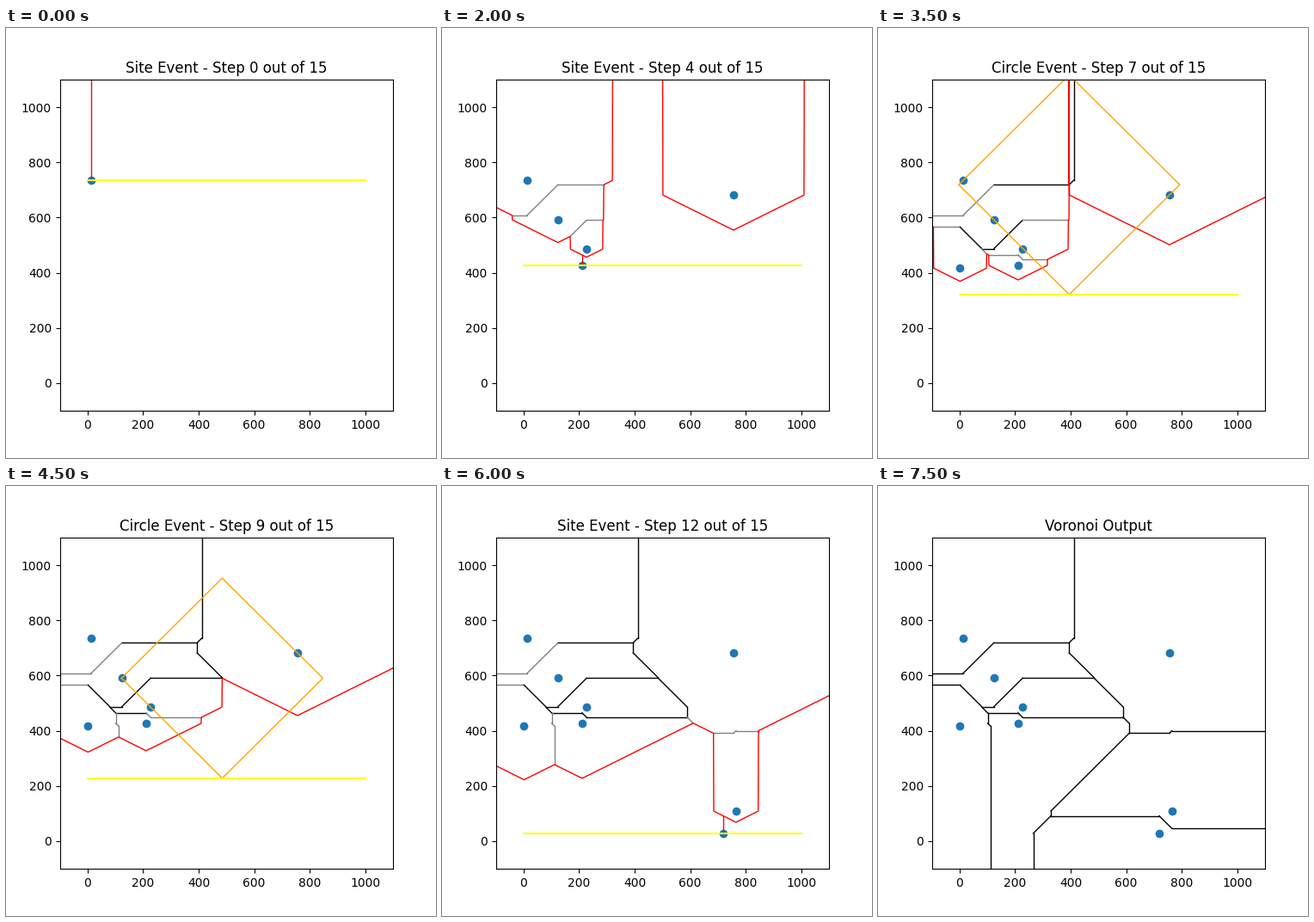
A matplotlib script that plays this animation: 500x500 px, repeating every 8 s.

```python
import numpy as np
import matplotlib.pyplot as plt
from matplotlib.animation import FuncAnimation

LOW, HIGH, TOP, FAR = -100, 1100, 1120, 5000

SITES = dict(A=(13, 735), B=(124, 592), C=(227, 486), D=(211, 427),
             E=(2, 417), F=(756, 682), G=(765, 109), H=(719, 28))

# Voronoi vertices: where a beach arc vanishes
BCE, ABF, CDE = (80, 487.5), (395, 719), (101.5, 464.5)
BCF, CDF, DFG, DGH = (485, 590.5), (589.5, 448.5), (611, 391), (329, 91.5)

# Events in sweep order: a site name, or (centre, a site on the circle)
EVENTS = ["A", "F", "B", "C", "D", "E", (BCE, "B"), (ABF, "A"), (CDE, "C"),
          (BCF, "B"), "G", (CDF, "C"), "H", (DFG, "D"), (DGH, "D")]
LAST = len(EVENTS)
# Circle events where two upright arc sides coincide
SPIKES = (BCE, ABF, CDE)

# Half-edges: a neighbouring site and the path its breakpoint follows
EDGES = [
    ("B", [(124, 719), (13, 608), (-FAR, 608)]),
    ("B", [(124, 719), ABF]),
    ("B", [(2, 565.5), (-FAR, 565.5)]),
    ("B", [(2, 565.5), BCE]),
    ("C", [(227, 590.5), (124, 487.5), BCE]),
    ("C", [(227, 590.5), BCF]),
    ("D", [(211, 464.5), CDE]),
    ("D", [(211, 464.5), (227, 448.5), CDF]),
    ("E", [BCE, (80, 486), CDE]),
    ("E", [CDE, (101.5, 427), (111.5, 417), (111.5, -FAR)]),
    ("A", [(411, 2000), (411, 735), ABF]),
    ("B", [ABF, (395, 682), (485, 592), BCF]),
    ("C", [BCF, (589.5, 486), CDF]),
    ("D", [CDF, (611, 427), DFG]),
    ("G", [(765, 400), (756, 391), DFG]),
    ("G", [(765, 400), (FAR, 400)]),
    ("D", [DFG, (329, 109), DGH]),
    ("H", [(719, 91.5), DGH]),
    ("H", [(719, 91.5), (765, 45.5), (FAR, 45.5)]),
    ("D", [DGH, (265.5, 28), (265.5, -FAR)]),
]


def distance(p, q):
    return abs(p[0] - q[0]) + abs(p[1] - q[1])


def sweep_at(point, site):
    """Sweep height at which the beach line passes through a point."""
    return point[1] - distance(point, SITES[site])


def traced(path, site, sweep):
    """Part of a half-edge already drawn, and whether it is complete."""
    levels = [sweep_at(p, site) for p in path]
    n = sum(level >= sweep - 1e-6 for level in levels)
    points = list(path[:n])
    if 0 < n < len(path):
        t = (levels[n - 1] - sweep) / (levels[n - 1] - levels[n])
        (x0, y0), (x1, y1) = path[n - 1], path[n]
        points.append((x0 + t * (x1 - x0), y0 + t * (y1 - y0)))
    return points, n == len(path)


def beach(x, sweep):
    """Lower envelope of the taxicab parabolas."""
    y = np.full(np.shape(x), float(TOP))
    for sx, sy in SITES.values():
        reach = np.abs(x - sx)
        arc = np.where(reach < sy - sweep, (reach + sy + sweep) / 2, TOP)
        y = np.minimum(y, arc)
    return y


def draw_edges(sweep, finished):
    for site, path in EDGES:
        points, complete = traced(path, site, sweep)
        color = "black" if complete or finished else "gray"
        for (x0, y0), (x1, y1) in zip(points, points[1:]):
            ax.plot([x0, x1], [y0, y1], color=color, lw=1)


def draw_event(event, sweep):
    ax.plot([0, 1000], [sweep, sweep], color="yellow", lw=1.5, zorder=2.2)
    x = np.arange(LOW - 5, HIGH + 6)
    ax.plot(x, beach(x, sweep), color="red", lw=1)
    if isinstance(event, str):
        sx, sy = SITES[event]
        color = "#e01020" if event == "A" else "red"
        ax.plot([sx, sx], [sy, beach(sx, sweep)], color=color, lw=1)
        return
    (cx, cy), site = event
    r = distance((cx, cy), SITES[site])
    ax.plot([cx - r, cx, cx + r, cx, cx - r], [cy, cy + r, cy, cy - r, cy],
            color="orange", lw=1)
    if (cx, cy) in SPIKES:
        ax.plot([cx, cx], [cy, TOP], color="red", lw=1.5)


def draw(step):
    ax.clear()
    finished = step == LAST
    if finished:
        title, sweep = "Voronoi Output", -FAR / 2
    else:
        event = EVENTS[step]
        is_site = isinstance(event, str)
        sweep = SITES[event][1] if is_site else sweep_at(*event)
        kind = "Site" if is_site else "Circle"
        title = f"{kind} Event - Step {step} out of {LAST}"
    seen = [p for p in SITES.values() if p[1] >= sweep]
    ax.scatter(*zip(*seen), color="tab:blue")
    draw_edges(sweep, finished)
    if not finished:
        draw_event(event, sweep)
    ax.set(xlim=(LOW, HIGH), ylim=(LOW, HIGH), title=title)


fig, ax = plt.subplots(figsize=(5, 5), dpi=100)
anim = FuncAnimation(fig, draw, frames=LAST + 1, init_func=lambda: None,
                     interval=500, repeat=True, repeat_delay=0)
plt.show()
```
